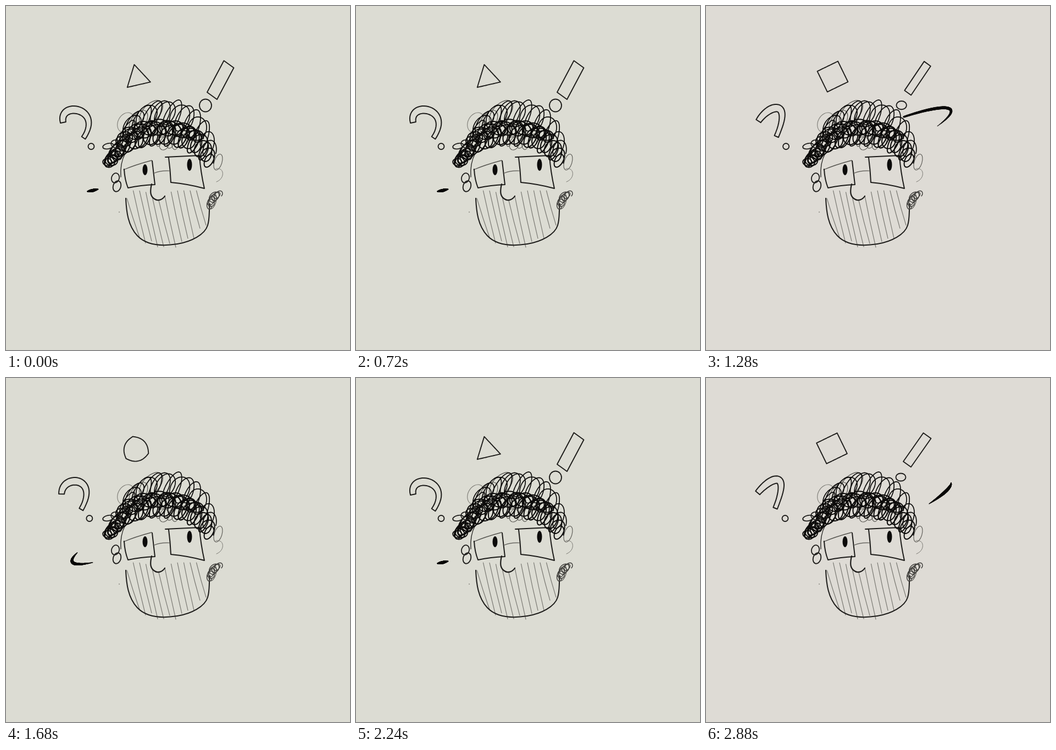
Recreate the animation shown at these times as an HTML page with a canvas. Size 626 px wide and 626 px high, loop 2960 ms.

```html
<!DOCTYPE html>
<html lang="en">
<head>
<meta charset="utf-8">
<title>Puzzled doodle</title>
<style>
html, body { margin: 0; width: 100%; height: 100%; overflow: hidden; background: #dedbd5; }
canvas { display: block; width: 626px; height: 626px; }
</style>
</head>
<body>
<canvas id="stage" width="626" height="626"></canvas>
<script>
const ctx = document.getElementById('stage').getContext('2d');
const INK = '#1d1c1a', BLACK = '#0c0b0a', SOFT = '#55544f', GREY = '#7a7973';
const STEP = 80, LOOP = 2960, POSES = 9, TAU = 2 * Math.PI, DEG = Math.PI / 180;

const clamp = (v, lo, hi) => Math.min(hi, Math.max(lo, v));
const lerp = (a, b, k) => a + (b - a) * k;
const mix = (a, b, k) => a.map((v, i) => lerp(v, b[i], k));

function bezier(p, t) {
  const u = 1 - t;
  const at = i => u * u * u * p[i] + 3 * u * u * t * p[i + 2] + 3 * u * t * t * p[i + 4] + t * t * t * p[i + 6];
  return [at(0), at(1)];
}

function pen(width, color = INK) {
  ctx.lineWidth = width;
  ctx.strokeStyle = color;
}

function line(d, width, color) {
  pen(width, color);
  ctx.stroke(new Path2D(d));
}

function oval(x, y, rx, ry, width = 1.9, color = INK, tilt = 0) {
  pen(width, color);
  ctx.beginPath();
  ctx.ellipse(x, y, rx, ry, tilt, 0, TAU);
  ctx.stroke();
}

function blob(x, y, rx, ry = rx) {
  ctx.fillStyle = BLACK;
  ctx.beginPath();
  ctx.ellipse(x, y, rx, ry, 0, 0, TAU);
  ctx.fill();
}

function outline(points, width = 1.9) {
  pen(width);
  ctx.beginPath();
  for (const p of points) ctx.lineTo(...p);
  ctx.closePath();
  ctx.stroke();
}

// Scribbled loops travelling along a cubic spine, smaller towards its ends.
function coil(spine, loops, rx, ry, leans, width, color = BLACK) {
  const steps = loops * 30;
  pen(width, color);
  ctx.beginPath();
  for (let i = 0; i <= steps; i++) {
    const t = i / steps, a = t * loops * TAU;
    const [x, y] = bezier(spine, t);
    const size = 1 - 0.35 * Math.pow(2 * t - 1, 4);
    const ex = rx * size * (1 + 0.25 * Math.sin(a * 0.37 + loops)) * Math.cos(a);
    const ey = ry * size * (1 + 0.16 * Math.sin(a * 0.61 + rx)) * Math.sin(a);
    const lean = lerp(...leans, t), c = Math.cos(lean), s = Math.sin(lean);
    ctx.lineTo(x + ex * c - ey * s, y + ex * s + ey * c);
  }
  ctx.stroke();
}

function drawHair() {
  oval(218, 212, 14, 19, 1.1, GREY, 0.5);
  oval(264, 194, 15, 27, 1.3, SOFT, 0.75);
  oval(241, 210, 13, 23, 1.3, SOFT, 0.6);
  coil([278, 247, 292, 249, 312, 250, 328, 242], 5, 9, 13, [0.5, 0.3], 1.1, SOFT);
  coil([217, 232, 245, 180, 345, 174, 374, 266], 16, 12, 24, [0.6, 0.3], 1.7);
  coil([190, 282, 213, 228, 345, 207, 372, 284], 26, 12, 20, [0.6, 0.35], 2);
  coil([209, 250, 235, 214, 310, 214, 350, 238], 18, 15, 13, [0.3, 0.4], 2);
  coil([182, 284, 192, 286, 200, 274, 214, 250], 8, 9, 9, [0.4, 0.4], 1.9);
  oval(186, 255, 10, 5, 1.8, INK, -0.2);
  oval(200, 251, 9, 7, 1.7, INK, 0.2);
  oval(199, 313, 7, 9, 1.8, INK, 0.3);
  oval(202, 328, 7, 10, 1.9, INK, 0.3);
  oval(386, 284, 7, 15, 1.1, SOFT, 0.3);
  line('M382 296 C398 293 399 314 383 320', 1, GREY);
}

// Beard lines start below the nose and end along the jaw.
function drawBeard() {
  for (let i = 0; i < 12; i++) {
    const x = 220 + 11.5 * i, end = x + 23 - i * 0.5;
    const top = 336 + 16 * Math.exp(-(((x - 277) / 17) ** 2)) + (i ? 0 : 14);
    const bottom = 437 - 40 * ((end - 290) / 75) ** 2 + 5 * Math.sin(i * 2.3);
    line(`M${x} ${top} Q${(x + end) / 2 - 1} ${(top + bottom) / 2} ${end} ${bottom}`, 1.2, GREY);
  }
}

function drawFace() {
  drawBeard();
  line('M217 268 C210 281 208 297 209 311', 1.3);
  line('M218 350 C219 374 222 400 239 418 C257 437 287 437 312 433 C337 429 362 416 367 399 C371 386 369 374 371 360', 2);
  line('M214 298 Q235 289 265 281', 1.3, SOFT);
  line('M266 282 L271 325 Q245 326 222 331 Q216 316 215 297', 2);
  line('M290 275 L352 272 Q354 301 361 332 Q332 324 300 321 Q299 298 296 276', 2);
  line('M270 304 Q282 299 298 300', 1.1, SOFT);
  line('M265 324 C262 337 262 346 270 351 C277 356 285 352 289 346', 2.2);
  blob(253, 298, 4.5, 10);
  blob(334, 289, 4.5, 11);
  coil([371, 364, 373, 352, 378, 346, 389, 342], 6, 6, 9, [0.2, 0.9], 1.4, '#3b3a37');
  oval(376, 356, 6, 14, 1.1, SOFT, 0.3);
  oval(206, 375, 0.6, 0.6, 0.8, GREY);
}

// A ribbon of even width around a hooked spine.
function drawQuestion(drift) {
  const spine = mix([104, 212, 95, 172, 178, 185, 141, 240], [94, 209, 118, 180, 155, 165, 126, 237], drift);
  const left = [], right = [], steps = 30;
  for (let i = 0; i <= steps; i++) {
    const t = i / steps;
    const [x, y] = bezier(spine, t), [nx, ny] = bezier(spine, t + 0.001);
    const len = Math.hypot(nx - x, ny - y), half = 5 + 1.8 * Math.sin(4 * t);
    const ox = (ny - y) / len * Math.max(half, 4), oy = (x - nx) / len * Math.max(half, 4);
    left.push([x + ox, y + oy]);
    right.unshift([x - ox, y - oy]);
  }
  outline([...left, ...right], 2);
  oval(lerp(155, 144, drift), 255.5, 5.5, 5.5);
}

// Triangle melts into a circle, which hardens into a square.
function drawToken(pose, drift) {
  const early = pose < 4;
  const sides = early ? 3 : 4, radius = early ? 25 : 29.5, turn = (early ? -103 : -71) * DEG;
  const sharp = early ? clamp(1 - pose / 2.6, 0, 1) : clamp((pose - 4) / 2, 0, 1);
  const sector = TAU / sides, points = [];
  for (let deg = 0; deg < 360; deg += 5) {
    const a = deg * DEG;
    const edge = radius * Math.cos(sector / 2) / Math.cos(a % sector - sector / 2);
    const r = lerp(24, edge, sharp);
    points.push([lerp(239, 229, drift) + r * Math.cos(a + turn), lerp(131, 128, drift) + r * Math.sin(a + turn)]);
  }
  outline(points);
}

// The bar spins about its length and vanishes edge-on.
function drawExclamation(pose, drift) {
  const width = Math.pow(Math.abs(pose - 2) / (pose < 2 ? 2 : 7), 0.75);
  if (!width) return;
  const [tx, ty, bx, by, dx, dy] = mix([405.5, 106, 375, 163.5, 363, 181], [402.5, 105, 366, 157, 354.5, 180.5], drift);
  const w = 9 * width, h = 6.5 * width;
  outline([[tx - w, ty - h], [tx + w, ty + h], [bx + w, by + h], [bx - w, by - h]]);
  oval(dx, dy, lerp(11, 9, drift), lerp(11.5, 7, drift));
}

// A trail on a tilted orbit, hidden where it passes behind the head.
function drawSwoosh(pose) {
  const tail = Math.min(398, 139 + 0.65 * pose ** 3);
  const head = Math.min(405, 150 + 20 * pose + 3.5 * pose ** 2);
  const tilt = -24 * DEG, c = Math.cos(tilt), s = Math.sin(tilt), steps = 240;
  for (let i = 0; i <= steps; i++) {
    const t = i / steps, a = lerp(tail, head, t) * DEG;
    if (Math.abs(Math.cos(a)) < 0.53) continue;
    const u = 178 * Math.cos(a), v = 28 * Math.sin(a);
    blob(283 + u * c - v * s, 262 + u * s + v * c, 0.6 + 2.1 * Math.sin(Math.PI * t));
  }
}

function drawPose(pose) {
  const drift = pose < 8 ? pose / 7 : 0.5;
  ctx.fillStyle = pose < 3 ? '#dcdcd3' : '#dedbd5';
  ctx.fillRect(0, 0, 626, 626);
  drawSwoosh(pose);
  drawFace();
  drawHair();
  drawQuestion(drift);
  drawToken(pose, drift);
  drawExclamation(pose, drift);
}

ctx.lineCap = ctx.lineJoin = 'round';
let shown = -1;

function tick(now) {
  const slot = Math.floor(now % LOOP / STEP);
  // Two poses are held for a second step.
  const pose = (slot - (slot > 9) - (slot > 29)) % POSES;
  if (pose !== shown) drawPose(shown = pose);
  requestAnimationFrame(tick);
}
tick(0);
</script>
</body>
</html>
```
